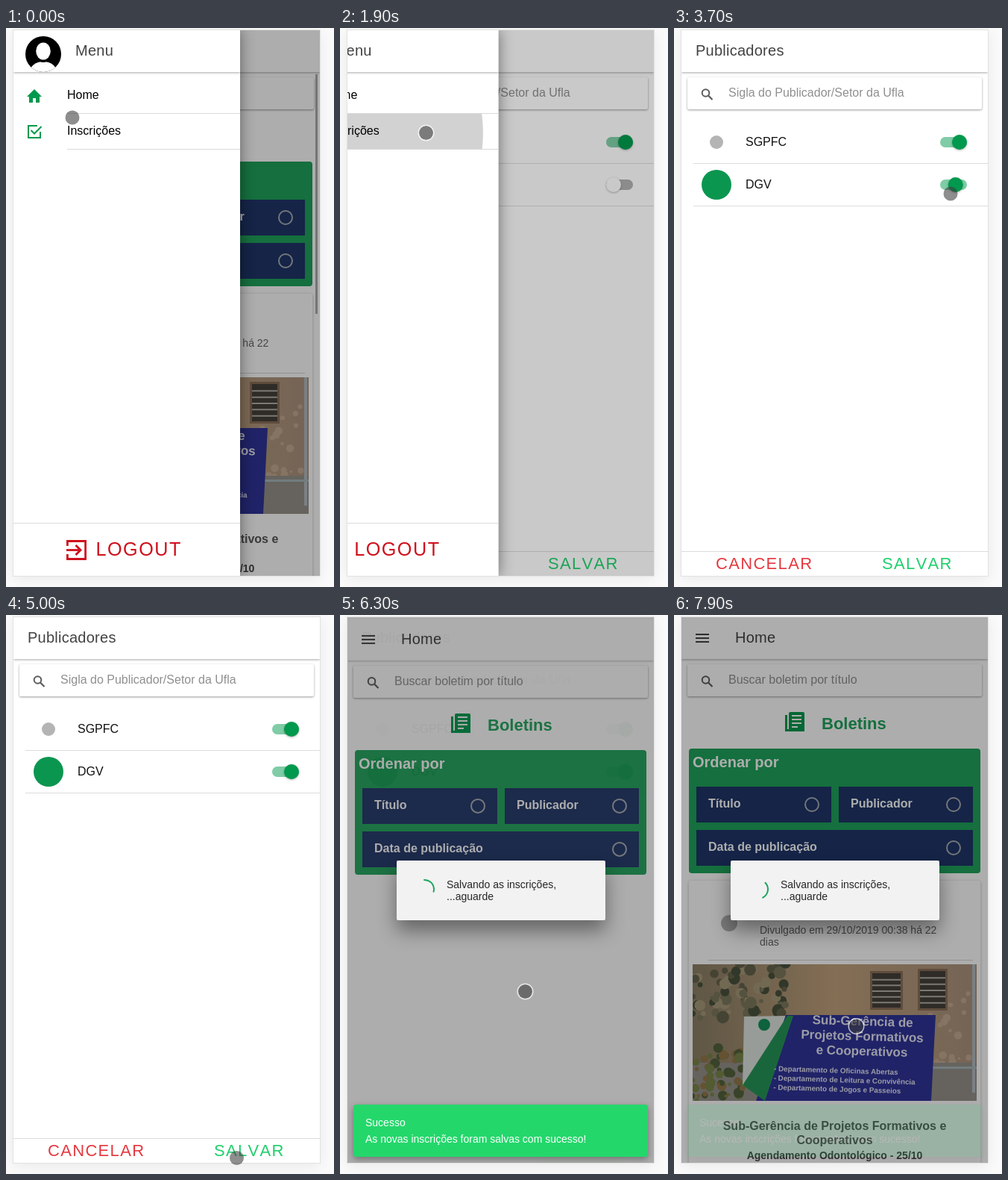
Animation, 440 px wide and 749 px high, one loop 8000 ms. Source, as an HTML page with a canvas:

```html
<!DOCTYPE html>
<html lang="pt-BR">
<head>
<meta charset="utf-8">
<title>Boletins</title>
<style>
  html, body { margin: 0; width: 100%; height: 100%; overflow: hidden; background: #fafafa; }
  canvas { display: block; }
</style>
</head>
<body>
<canvas id="stage" width="440" height="749"></canvas>
<script>
const W = 440, H = 749, LOOP = 8000, STEP = 100, GLIDE = 400;
const PHONE = [10, 3, 411, 731];
const MENU_WIDTH = 304;
const GREEN = '#00994d', PANEL = '#1fa35b', NAVY = '#1f3568', RED = '#cf101c';
const LINE = '#dcdcdc', INK = '#424242', MARK = '#b4b4b4';
const screen = document.getElementById('stage').getContext('2d');
const buffer = document.createElement('canvas');
buffer.width = W;
buffer.height = H;
const bufferCtx = buffer.getContext('2d');
let g = screen;

const ramp = (t, from, to) => Math.min(1, Math.max(0, (t - from) / (to - from)));
const easeOut = p => 1 - (1 - p) ** 2;
const mix = (a, b, p) => a + (b - a) * p;

function text(s, x, y, size, color, { bold = false, spacing = 0, align = 'left' } = {}) {
  g.font = `${bold ? 'bold ' : ''}${size}px "Liberation Sans", Arial, sans-serif`;
  g.letterSpacing = spacing + 'px';
  g.fontKerning = spacing ? 'none' : 'auto';
  g.textAlign = align;
  g.fillStyle = color;
  g.fillText(s, x, y);
}

function box(x, y, w, h, color, r = 0) {
  g.fillStyle = color;
  g.beginPath();
  g.roundRect(x, y, w, h, r);
  g.fill();
}

function raised(x, y, w, h, color, r, blur, dy, strength) {
  g.save();
  g.shadowColor = `rgba(0,0,0,${strength})`;
  g.shadowBlur = blur;
  g.shadowOffsetY = dy;
  box(x, y, w, h, color, r);
  g.restore();
}

function disc(x, y, r, color, ry = r) {
  g.fillStyle = color;
  g.beginPath();
  g.ellipse(x, y, r, ry, 0, 0, Math.PI * 2);
  g.fill();
}

function arc(x, y, r, width, color, from = 0, to = Math.PI * 2) {
  g.strokeStyle = color;
  g.lineWidth = width;
  g.beginPath();
  g.arc(x, y, r, from, to);
  g.stroke();
}

function path(...pts) {
  g.beginPath();
  for (let i = 0; i < pts.length; i += 2) g.lineTo(pts[i], pts[i + 1]);
}

function poly(color, ...pts) {
  path(...pts);
  g.fillStyle = color;
  g.fill();
}

function line(color, width, ...pts) {
  path(...pts);
  g.strokeStyle = color;
  g.lineWidth = width;
  g.stroke();
}

function clipped(area, draw) {
  g.save();
  g.beginPath();
  g.rect(...area);
  g.clip();
  draw();
  g.restore();
}

function layer(alpha, draw) {
  if (alpha <= 0) return;
  g = bufferCtx;
  g.clearRect(0, 0, W, H);
  g.save();
  draw();
  g.restore();
  g = screen;
  g.globalAlpha = alpha;
  g.drawImage(buffer, 0, 0);
  g.globalAlpha = 1;
}

const dim = amount => box(...PHONE, `rgba(0,0,0,${0.32 * amount})`);

function header(title, x, width = 411) {
  raised(10, 3, width, 56, '#fff', 0, 3, 1, 0.35);
  text(title, x, 37, 20, INK, { spacing: 0.25 });
}

function searchBox(hint) {
  raised(18, 66, 395, 43, '#fff', 2, 3, 1, 0.4);
  arc(42.5, 87, 4.8, 2, '#5b5b5b');
  line('#5b5b5b', 2.2, 46, 90.5, 51.5, 96);
  text(hint, 73, 92, 16, '#8f8f8f');
}

function publisher(name, y, markRadius, markColor, on) {
  disc(57, y, markRadius, markColor);
  text(name, 96, y + 5, 16, '#111');
  box(357, y - 7, 36, 14, on ? '#7fcca6' : '#b1b1b1', 7);
  raised(357 + 16 * on, y - 10, 20, 20, on > 0.5 ? GREEN : '#fff', 10, 3, 1, 0.3);
  box(26, y + 28, 395, 1, LINE);
}

function publishersPage(secondOn, ripple) {
  box(...PHONE, '#fff');
  header('Publicadores', 29);
  searchBox('Sigla do Publicador/Setor da Ufla');
  publisher('SGPFC', 153, 9, MARK, 1);
  publisher('DGV', 210, 20, '#0b9650', secondOn);
  box(10, 701, 411, 1, LINE);
  clipped([272, 702, 107, 32], () => disc(309, 718, ripple, 'rgba(28,190,100,.3)'));
  text('CANCELAR', 56, 725, 22, '#e53940', { spacing: 1.32 });
  text('SALVAR', 279, 725, 22, '#20cf6c', { spacing: 1.32 });
}

function sortOption(label, x, y, w) {
  box(x, y, w, 48, NAVY);
  text(label, x + 16, y + 28, 16, '#fff', { bold: true });
  arc(x + w - 26, y + 24, 9, 2, '#a9adb4');
}

function barredWindow(x, y, w, h) {
  box(x - 3, y - 3, w + 6, h + 6, '#8d7058');
  box(x, y, w, h, '#45403b');
  for (let i = 1; i < 6; i++) box(x, y + i * h / 6, w, 2, '#b5b2a8');
}

function scatter(count, x, y, w, h, size, colors) {
  let seed = 7;
  const rnd = () => (seed = seed * 16807 % 2147483647) / 2147483647;
  for (let i = 0; i < count; i++) {
    disc(x + rnd() * w, y + rnd() * h, size * (0.4 + rnd()), colors[i % colors.length]);
  }
}

function bannerText(lines, x, y, size, leading, align) {
  g.save();
  g.translate(x, y);
  g.rotate(0.03);
  lines.forEach((s, i) => text(s, 0, i * leading, size, '#e6e6f4', { bold: true, align }));
  g.restore();
}

function photo() {
  const wall = g.createLinearGradient(25, 0, 406, 0);
  wall.addColorStop(0, '#8c7f66');
  wall.addColorStop(0.5, '#c2a27c');
  wall.addColorStop(1, '#ac937e');
  box(25, 468, 381, 183, wall);
  scatter(70, 25, 465, 130, 75, 6, ['#4a523c', '#7d7a5c', '#a89a7a', '#66644c']);
  scatter(20, 340, 500, 60, 135, 4, ['#c4ab91']);
  barredWindow(266, 480, 38, 46);
  barredWindow(330, 477, 34, 50);
  box(25, 600, 381, 51, '#96918a');
  scatter(50, 25, 580, 70, 70, 5, ['#53633c', '#94794a', '#788648']);
  box(400, 468, 4, 172, '#b4bcc0');
  box(345, 605, 61, 3, '#a8b6b8');
  poly('#dfe5df', 94, 538, 152, 537, 120, 646, 92, 630);
  poly('#2f3498', 150, 536, 351, 536, 345, 651, 110, 651);
  poly('#269658', 152, 537, 160, 537, 122, 651, 92, 630);
  disc(121, 549, 8, '#15905a');
  bannerText(['Sub-Gerência de', 'Projetos Formativos', 'e Cooperativos'], 253, 550, 17, 20, 'center');
  const topics = ['Oficinas Abertas', 'Leitura e Convivência', 'Jogos e Passeios'];
  bannerText(topics.map(s => '- Departamento de ' + s), 134, 611, 9.8, 12.5, 'left');
}

function newsCard() {
  raised(20, 356, 391, 400, '#fff', 3, 4, 1, 0.25);
  disc(74, 413, 11, MARK);
  text('Divulgado em 29/10/2019 00:38 há 22', 115, 427, 14, '#666');
  text('dias', 115, 443, 14, '#666');
  box(46, 462, 355, 1, '#d6d6d6');
  clipped([25, 468, 381, 183], photo);
  const centered = { bold: true, align: 'center' };
  text('Sub-Gerência de Projetos Formativos e', 215.5, 690, 16, '#555', centered);
  text('Cooperativos', 215.5, 709, 16, '#555', centered);
  text('Agendamento Odontológico - 25/10', 215.5, 729, 14, '#444', centered);
}

function newsIcon() {
  box(149, 134, 3, 22, GREEN);
  box(149, 153, 26, 3, GREEN);
  box(154, 130, 21, 26, GREEN, 2);
  for (let i = 0; i < 4; i++) box(158, 134 + i * 5, i < 3 ? 13 : 8, 2, '#fff');
}

function homePage(withCard, scrollbar) {
  box(...PHONE, '#fff');
  if (withCard) newsCard();
  header('Home', 82);
  for (let i = 0; i < 3; i++) box(29, 25 + i * 5, 18, 2, INK);
  searchBox('Buscar boletim por título');
  newsIcon();
  text('Boletins', 198, 153, 22, PANEL, { bold: true });
  box(20, 179, 391, 167, PANEL, 4);
  text('Ordenar por', 25, 204, 20, '#fff', { bold: true });
  sortOption('Título', 30, 230, 181);
  sortOption('Publicador', 221, 230, 180);
  sortOption('Data de publicação', 30, 288, 371);
  box(415, 62, 3, 321, `rgba(0,0,0,${0.33 * scrollbar})`);
}

function avatar() {
  g.save();
  g.beginPath();
  g.arc(50, 35, 24, 0, Math.PI * 2);
  g.clip();
  box(26, 11, 48, 48, '#000');
  disc(50, 59, 18, '#fff', 14);
  disc(50, 32, 12, '#000', 14);
  disc(50, 31, 9.8, '#fff', 11.5);
  g.restore();
}

function menuItem(label, y) {
  text(label, 82, y + 5, 16, '#000');
  box(82, y + 24, 232, 1, '#d9d9d9');
}

function menuIcons() {
  poly(GREEN, 28, 92, 38, 82, 48, 92);
  box(31, 91, 5, 9, GREEN);
  box(40, 91, 5, 9, GREEN);
  box(31, 91, 14, 3, GREEN);
  line(GREEN, 2, 42, 131, 30, 131, 30, 147, 46, 147, 46, 139);
  line(GREEN, 2, 33.5, 137, 38, 141.5, 47.5, 132);
  line(RED, 2.8, 82.4, 694, 82.4, 687.5, 106.6, 687.5, 106.6, 711.5, 82.4, 711.5, 82.4, 705);
  line(RED, 2.8, 81, 699.5, 99, 699.5);
  line(RED, 2.8, 93.5, 693, 100, 699.5, 93.5, 706);
}

function menu(shift, ripple) {
  const area = [10, 3, MENU_WIDTH, 731];
  g.save();
  g.translate(-shift, 0);
  raised(...area, '#fff', 0, 18, 0, 0.45);
  clipped(area, () => {
    header('Menu', 93, MENU_WIDTH);
    avatar();
    clipped([10, 115, MENU_WIDTH, 47], () => disc(115.5, 140, ripple, '#d2d2d2'));
    menuIcons();
    menuItem('Home', 90);
    menuItem('Inscrições', 138);
    box(10, 663, MENU_WIDTH, 1, LINE);
    text('LOGOUT', 120.5, 707, 25.2, RED, { spacing: 1.5 });
  });
  g.restore();
}

function dialog(t, progress) {
  const scale = 1.1 - 0.1 * progress;
  g.translate(216, 369);
  g.scale(scale, scale);
  g.translate(-216, -369);
  raised(76, 329, 280, 80, '#f2f2f2', 2, 26, 14, 0.42);
  const angle = (t - 6380) / 750 * Math.PI * 2;
  arc(113.5, 367.5, 12.5, 2, '#1aa55e', angle - 1, angle + 1);
  text('Salvando as inscrições,', 143, 366, 14, '#262626');
  text('...aguarde', 143, 382, 14, '#262626');
}

function toast() {
  raised(18, 656, 395, 70, '#24d76b', 4, 8, 3, 0.35);
  text('Sucesso', 34, 685, 14, '#fff');
  text('As novas inscrições foram salvas com sucesso!', 34, 707, 14, '#fff');
}

// Arrival time and place of each glide of the pointer
const STOPS = [
  [0, 89, 120], [400, 116, 147], [1500, 115.5, 140.5], [2600, 299, 196], [3200, 371, 222],
  [4400, 344, 534], [4800, 309.5, 727.5], [5400, 309.5, 718.5], [6300, 248.5, 504.5], [6800, 244.5, 551]
];

function pointer(t) {
  let [, x, y] = STOPS[0];
  for (const [arrival, toX, toY] of STOPS) {
    const p = ramp(t, arrival - GLIDE, arrival);
    x = mix(x, toX, p);
    y = mix(y, toY, p);
  }
  const pressed = (t >= 1600 && t <= 2000) || t >= 5700;
  disc(x, y, 9.5, 'rgba(60,60,60,.58)');
  if (pressed) arc(x, y, 10.3, 1.5, 'rgba(255,255,255,.7)');
}

function render(t) {
  const closing = ramp(t, 1770, 2160);
  const loading = ramp(t, 5610, 5910);
  const arriving = easeOut(ramp(t, 6050, 6370));
  const scrollbar = 1 - ramp(t, 7200, 7400);

  box(0, 0, W, H, '#fafafa');
  raised(...PHONE, '#fff', 0, 18, 3, 0.08);
  box(9, 2, 413, 733, '#e2e2e2');

  clipped(PHONE, () => {
    homePage(true, 1);
    layer(ramp(t, 1700, 1900), () => publishersPage(ramp(t, 3500, 3800), 90 * ramp(t, 5600, 5800)));
    layer(arriving, () => {
      g.translate(0, 40 * (1 - arriving));
      homePage(t >= 6600, t >= 6600 ? scrollbar : 0);
    });
    if (closing < 1) {
      dim(1 - closing);
      menu(MENU_WIDTH * closing, 240 * ramp(t, 1700, 1970));
    }
    dim(loading);
    layer(loading, () => dialog(t, loading));
    layer(ramp(t, 6000, 6300) - ramp(t, 7600, 7945), toast);
  });
  pointer(t);
}

const start = performance.now();
function tick() {
  const t = (performance.now() - start) % LOOP;
  render(Math.floor(t / STEP) * STEP);
  requestAnimationFrame(tick);
}
tick();
</script>
</body>
</html>
```
